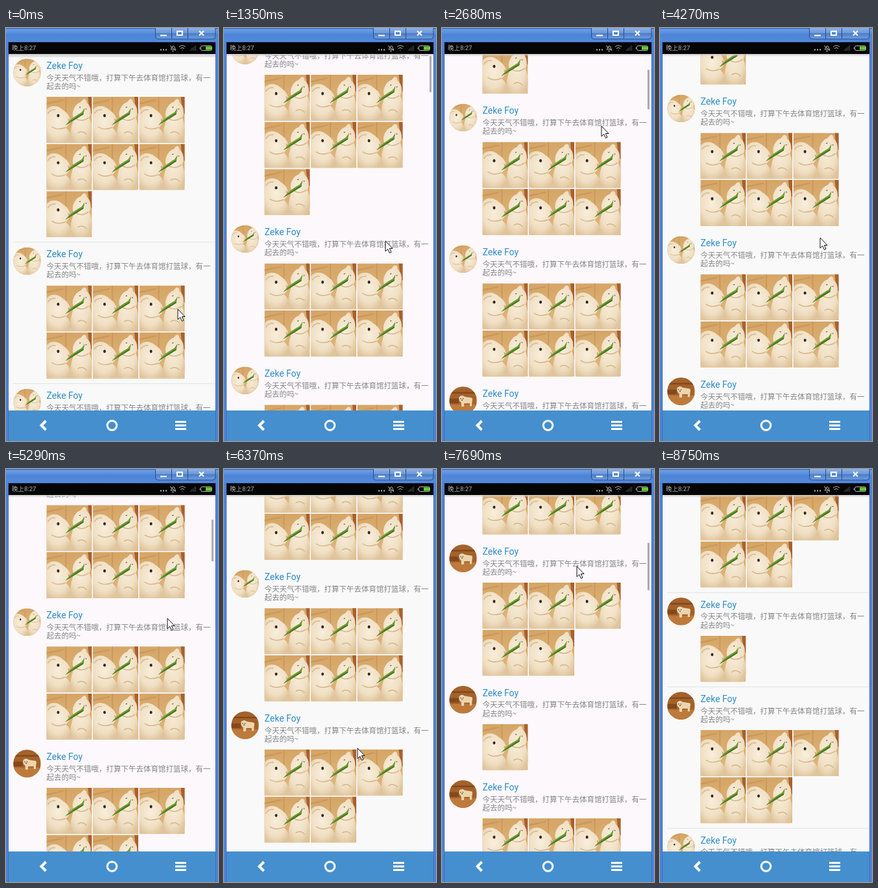
Recreate the animation shown at these times as an HTML page. Size 327 by 636 pixels, loop 8.86 s.

```html
<!DOCTYPE html>
<html lang="zh">
<head>
<meta charset="utf-8">
<style>
html, body { margin: 0; width: 100%; height: 100%; overflow: hidden; }
svg { display: block; width: 327px; height: 636px; }
.name { font: 14px Roboto, sans-serif; fill: #2d8cc8; }
.post { font: 11.5px "Noto Sans CJK SC", "Noto Sans CJK", sans-serif; fill: #858585; }
.clock { font: 9.5px Roboto, "Noto Sans CJK SC", sans-serif; fill: #b4b4b4; }
</style>
</head>
<body>
<svg viewBox="0 0 327 636">
  <defs>
    <linearGradient id="title" x2="0" y2="1">
      <stop stop-color="#3567b4"/><stop offset=".12" stop-color="#6a9ee6"/>
      <stop offset=".5" stop-color="#4d84d6"/><stop offset="1" stop-color="#5489dc"/>
    </linearGradient>
    <linearGradient id="button" x2="0" y2="1">
      <stop stop-color="#8fb3e8"/><stop offset=".5" stop-color="#6c97d8"/>
      <stop offset=".5" stop-color="#4a7bc6"/><stop offset="1" stop-color="#6f9fe0"/>
    </linearGradient>
    <linearGradient id="shade" x2="0" y2="1">
      <stop stop-color="#ccc"/><stop offset="1" stop-color="#ccc" stop-opacity="0"/>
    </linearGradient>
    <linearGradient id="wood" x2="0" y2="1">
      <stop stop-color="#d5a566"/><stop offset="1" stop-color="#dfb880"/>
    </linearGradient>
    <radialGradient id="fur" cx=".45" cy=".4" r=".65">
      <stop stop-color="#f8eedb"/><stop offset=".65" stop-color="#f0dfc3"/><stop offset="1" stop-color="#dfc49c"/>
    </radialGradient>
    <clipPath id="round"><circle cx="21.5" cy="21.5" r="21.3"/></clipPath>
    <clipPath id="view"><path d="M4 40h319v549H4z"/></clipPath>
    <symbol id="rabbits" viewBox="0 0 70 71">
      <path fill="url(#wood)" d="M0 0h70v71H0z"/>
      <path fill="#c68e50" d="M29 0h2v24h-2zM0 9l26-5v2L0 12z" opacity=".6"/>
      <path fill="#a9602f" d="M64 0h6v27l-4-6z"/>
      <path fill="url(#fur)" d="M39 71C34 54 40 43 42 33C37 25 44 10 53 8C57 1 62 2 62 9C69 14 70 25 66 32C71 42 72 61 67 71z"/>
      <path fill="url(#fur)" d="M0 20C6 12 18 13 25 20C32 24 38 32 36 39C34 44 31 46 30 48C38 54 40 64 39 71H0z"/>
      <path fill="none" stroke="#d5b68b" stroke-width="1.5" d="M2 26C5 21 9 19 14 20M8 46C15 51 23 50 30 47M45 33C51 38 59 37 65 32M48 56C53 52 59 54 62 58"/>
      <ellipse cx="18" cy="29" rx="2" ry="2.4" fill="#35251c"/>
      <path fill="#5b4233" d="M50 16l3-1-1 2zM60 18l2 0-1 2z"/>
      <path fill="#d3a38c" d="M33 33l4 3-3 3z"/>
      <path fill="#6e9c35" d="M29 44C36 35 45 29 54 24L59 17L57 27C48 33 40 38 29 44z"/>
      <path fill="#46741f" d="M29 44C40 37 49 32 57 27L57 25C47 30 39 36 29 44z"/>
    </symbol>
    <symbol id="dog" viewBox="0 0 70 71">
      <path fill="#a4622b" d="M0 0h70v71H0z"/>
      <path fill="#bd7a3b" d="M0 46h70v25H0z"/>
      <path fill="#85481d" d="M0 14h70v4H0zM0 31h24v12H0z"/>
      <path fill="#ecd5ae" d="M25 27Q32 20 39 26L57 29Q60 31 58 39L57 50H52V43H38L37 51H31L30 41Q23 37 25 27z"/>
      <path fill="#3a2416" d="M28 30h2v2h-2zM34 30h2v2h-2zM31 34h3v2h-3z"/>
    </symbol>
  </defs>

  <path fill="#3f72cb" d="M0 0h327v636H0z"/>
  <path fill="#6d9ae2" d="M1 8h1v628H1zM325 8h1v628h-1z"/>
  <path fill="url(#title)" d="M0 0h327v21H0z"/>
  <path fill="url(#button)" stroke="#264c8c" d="M230.5-1V13q0 4 4 4H319q4 0 4-4V-1M255.5 0V17M280.5 0V17"/>
  <g fill="none" stroke="#fff" stroke-width="2">
    <path d="M238 11.500h10"/><path d="M264 5h8v6h-8z"/><path d="M298 4.500l7 7M305 4.500l-7 7"/>
  </g>

  <path id="back" fill="#f9f9f9" d="M4 40h319v549H4z"/>
  <g clip-path="url(#view)">
    <g id="list"><path fill="#e4e4e4" d="M4 38h319v7H4z"/></g>
    <path fill="url(#shade)" d="M4 40h319v4H4z"/>
    <rect id="bar" x="317" width="3" fill="#adabad"/>
  </g>

  <path d="M4 22h319v18H4z" fill="#050505"/>
  <text class="clock" x="9" y="34">晚上8:27</text>
  <g fill="none" stroke="#bbb">
    <path stroke-width="2" stroke-dasharray="2 2" d="M238 33.500h10"/>
    <path d="M254 33q2-2 2-4q2-3 4 0q0 3 2 4zM256 35.500h3M253 27l9 8"/>
    <path d="M267 29q5-4 10 0M269 31.500q3-2.500 6 0M271.500 34h1"/>
    <path stroke="#444" d="M284.500 33v2M286.500 31v4M288.500 30v5M290.500 28v7M292.500 27v8"/>
    <rect x="300.500" y="27.500" width="17" height="7" rx="2"/><path d="M299 30v2"/>
    <path stroke="#62d421" stroke-width="5" d="M308 31h9"/>
  </g>

  <path d="M4 589h319v47H4z" fill="#458fce"/>
  <g fill="none" stroke="#fff">
    <path stroke-width="4" d="M61.500 605l-7 7 7 7"/>
    <circle cx="163.500" cy="612" r="7.300" stroke-width="3"/>
    <path stroke-width="3" d="M261 606.500h17M261 612h17M261 617.500h17"/>
  </g>
  <path id="cursor" fill="#fff" stroke="#111" d="M0 0V16L3.700 12.500L6.500 18.500L9 17.300L6.300 11.500H11z"/>
</svg>
<script>
const $ = id => document.getElementById(id);
const show = (el, on) => el.style.display = on ? '' : 'none';
const LOOP = 8860, STEP = 265.2, ROW = 72.6;

const picture = (_, i) =>
  `<use href="#rabbits" x="${62.3 + i % 3 * 71.6}" y="${59 + Math.floor(i / 3) * ROW}" width="70.3" height="71"/>`;

const post = (y, avatar, count) => `<g transform="translate(0 ${y})">
  <path class="rule" d="M11 -7.5H323" stroke="#e3e3e3"/>
  <g clip-path="url(#round)" transform="translate(11 0)"><use href="#${avatar}" width="43" height="43"/></g>
  <text class="name" x="62.5" y="16">Zeke Foy</text>
  <text class="post" x="62.5" y="33.5">今天天气不错哦，打算下午去体育馆打篮球，有一</text>
  <text class="post" x="62.5" y="47">起去的吗~</text>
  ${Array.from({ length: count }, picture).join('')}</g>`;

let postY = 47;
[7, 6, 6, 5, 1, 5, 3].forEach((count, i) => {
  $('list').innerHTML += post(postY, i > 2 && i < 6 ? 'dog' : 'rabbits', count);
  postY += ROW * (Math.ceil(count / 3) + 1);
});
const rules = document.querySelectorAll('.rule');

// Three swipes: [step, scroll] and [step, x, y]
const scrollKeys = [[0, 0], [4, 0], [7, 102], [10, 221], [11, 235], [17, 235], [20, 341],
  [22, 400], [24, 400], [26, 480], [31, 775], [32, 793]];
const cursorKeys = [[0, 265, 433], [4, 250, 367], [7, 246, 251], [10, 246, 151], [12, 246, 151],
  [16, 247, 323], [17, 249, 340], [20, 249, 230], [22, 235, 600], [24, 206, 430], [26, 205, 311], [31, 210, 42]];

function sample(keys, step) {
  const next = keys.findIndex(k => k[0] > step);
  if (next < 0) return keys.at(-1).slice(1);
  const a = keys[Math.max(0, next - 1)], b = keys[next];
  const p = Math.max(0, (step - a[0]) / (b[0] - a[0]));
  return a.slice(1).map((v, i) => Math.round(v + (b[i + 1] - v) * p));
}

function draw(time) {
  const step = Math.floor((time + 20) / STEP);
  const [scroll] = sample(scrollKeys, step);
  const moving = scroll !== sample(scrollKeys, step - 1)[0];
  $('list').setAttribute('transform', `translate(0 ${-scroll})`);
  $('back').setAttribute('fill', moving ? '#fcf8fb' : '#f9f9f9');
  $('bar').setAttribute('y', 39.5 + scroll * .113);
  $('bar').setAttribute('height', 54.5 + scroll * .028);
  show($('bar'), moving);
  rules.forEach(rule => show(rule, step < 5 || step > 31));
  $('cursor').setAttribute('transform', `translate(${sample(cursorKeys, step)})`);
  show($('cursor'), step < 32);
}

let start;
function loop(now) {
  start ??= now;
  draw((now - start) % LOOP);
  requestAnimationFrame(loop);
}
draw(0);
requestAnimationFrame(loop);
</script>
</body>
</html>
```
